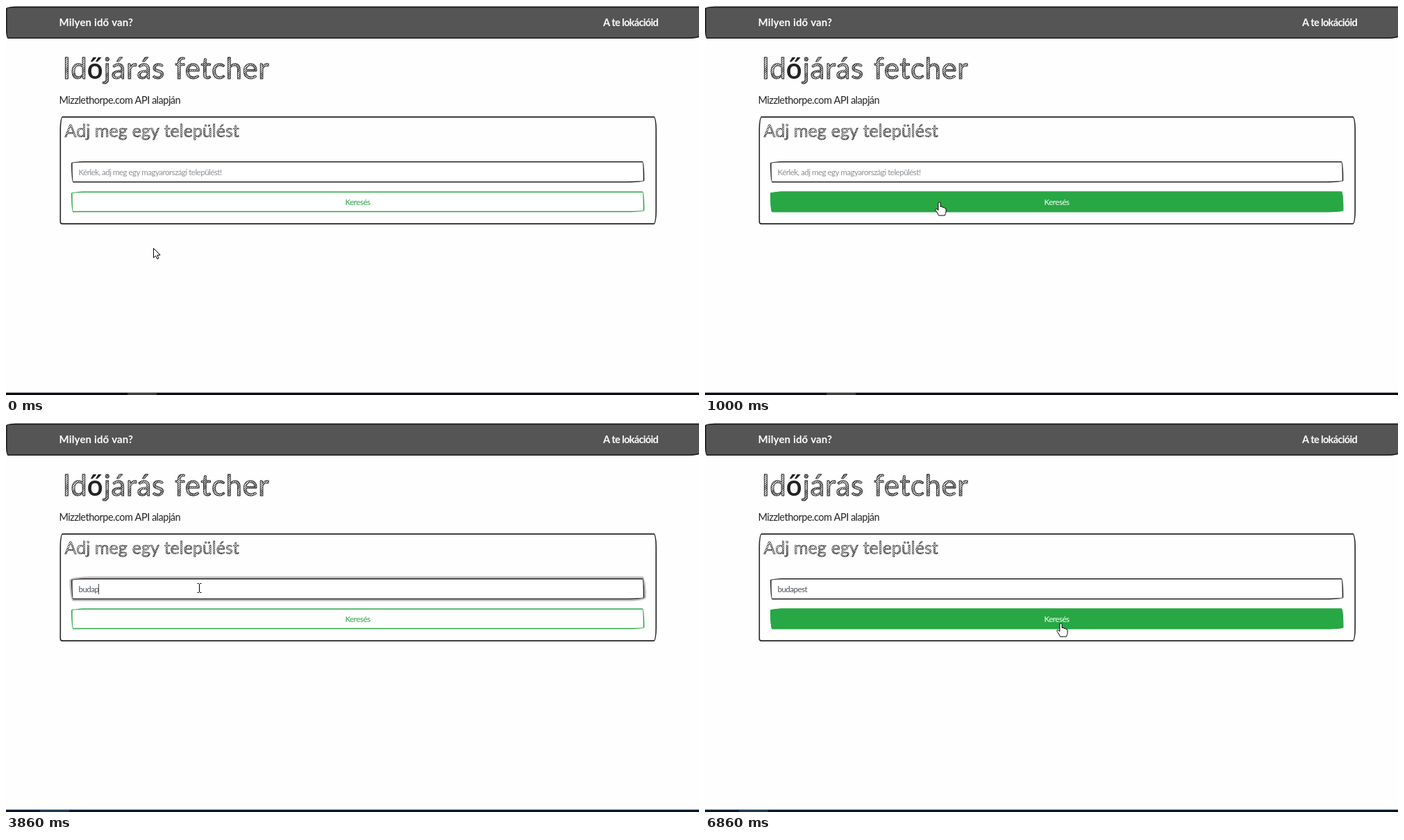
Write an HTML page with a canvas that moves like this. It is 998 px wide and 561 px high and loops after 8 s.

```html
<!DOCTYPE html>
<html lang="hu">
<head>
<meta charset="utf-8">
<title>Időjárás fetcher</title>
<style>
  html, body { margin: 0; width: 100%; height: 100%; overflow: hidden; background: #fefefe; }
  canvas { display: block; width: 998px; height: 561px; }
</style>
</head>
<body>
<canvas id="stage" width="998" height="561"></canvas>
<script>
const ctx = document.getElementById('stage').getContext('2d');
const LOOP = 8000, STEP = 1000 / 15;
const INK = '#232323', PAGE = '#fefefe', GREEN = [40, 167, 69], WHITE = [255, 255, 255];

// Elliptical corner radii [x, y], clockwise from top left
const ROUGH = [[255, 25], [25, 225], [225, 25], [25, 255]];
const CARD = [[4, 19], [4, 19], [4, 19], [4, 4]];
const BAR = [[19, 4], [19, 43], [43, 19], [4, 19]];
const FIELD = { x: 94, y: 223.9, w: 825.3, h: 30.6 };
const BUTTON = { x: 94, y: 267.4, w: 825.3, h: 29.9 };

const ARROW = new Path2D('M0 0V13.6L3.2 10.7 5.3 15.3 7.4 14.4 5.4 9.9 9.6 9.6Z');
const HAND = new Path2D('M-1.6 1.2Q0-.8 1.6 1.2V7Q4 5.6 4.8 8 7 7 7.6 9 9.6 8.4 9.6 11V14Q9.4 17 7.7 19.6H-1Q-2 17-4.8 13-6.8 10.4-5 10-3.4 10-1.6 12Z');
const BEAM = new Path2D('M-3-6.5H-1L0-5.5 1-6.5H3M0-5.5V5.5M-3 6.5H-1L0 5.5 1 6.5H3');

// Pointer path: time, x, y
const PATH = [
  [470, 212, 349], [600, 232, 337], [760, 282, 303], [870, 320, 288], [1000, 337, 282],
  [1130, 331, 277], [1260, 306, 262], [1400, 287, 243], [1730, 278, 238],
  [5270, 278, 238], [5400, 310, 243], [5530, 388, 255], [5640, 468, 277],
  [5730, 506, 290], [6060, 511, 288], [6540, 511, 288], [6600, 512, 288]
];
// When each letter of the typed word appears
const WORD = 'budapest';
const KEYS = [3130, 3260, 3530, 3600, 3860, 4000, 4060, 4260];
const BLINK = 533;

const clamp = v => Math.max(0, Math.min(1, v));
const ramp = (t, start, length) => clamp((t - start) / length);
const mix = (a, b, k) => `rgb(${a.map((v, i) => Math.round(v + (b[i] - v) * k))})`;

function pointerAt(t) {
  let i = PATH.findIndex(p => p[0] > t);
  if (i === 0) return PATH[0].slice(1);
  if (i < 0) return PATH[PATH.length - 1].slice(1);
  const [t0, x0, y0] = PATH[i - 1], [t1, x1, y1] = PATH[i];
  const k = (t - t0) / (t1 - t0);
  return [x0 + (x1 - x0) * k, y0 + (y1 - y0) * k];
}

function fitRadii({ w, h }, radii) {
  const [a, b, c, d] = radii;
  const k = Math.min(1, w / (a[0] + b[0]), w / (c[0] + d[0]), h / (a[1] + d[1]), h / (b[1] + c[1]));
  return radii.map(r => r.map(v => v * k));
}

function addBox({ x, y, w, h }, radii, grow = 0) {
  const corners = radii.map(([rx, ry]) => ({ x: Math.max(0, rx + grow), y: Math.max(0, ry + grow) }));
  ctx.roundRect(x - grow, y - grow, w + 2 * grow, h + 2 * grow, corners);
}

function fillBox(box, shape, color) {
  ctx.beginPath();
  addBox(box, fitRadii(box, shape));
  ctx.fillStyle = color;
  ctx.fill();
}

function ring(box, shape, outer, inner, color) {
  const radii = fitRadii(box, shape);
  ctx.beginPath();
  addBox(box, radii, outer);
  addBox(box, radii, inner);
  ctx.fillStyle = color;
  ctx.fill('evenodd');
}

function setFont(font, spacing = 0, wordSpacing = 0) {
  ctx.font = `${font} Lato, sans-serif`;
  ctx.letterSpacing = spacing + 'px';
  ctx.wordSpacing = wordSpacing + 'px';
}

function label(text, x, y, font, color, spacing, align = 'left') {
  setFont(font, spacing);
  ctx.textAlign = align;
  ctx.fillStyle = color;
  ctx.fillText(text, x, y);
}

function makeHatch() {
  const tile = document.createElement('canvas');
  tile.width = tile.height = 24;
  const g = tile.getContext('2d');
  g.fillStyle = '#e4e4e4';
  g.fillRect(0, 0, 24, 24);
  g.strokeStyle = '#333';
  for (let i = -24; i < 48; i += 3) {
    g.lineWidth = 0.8 + 0.6 * Math.abs(Math.sin(i % 24));
    g.beginPath();
    g.moveTo(i, 24);
    g.lineTo(i + 24, 0);
    g.stroke();
  }
  return ctx.createPattern(tile, 'repeat');
}
const hatch = makeHatch();

function sketch(text, x, y, line) {
  ctx.textAlign = 'left';
  ctx.lineJoin = 'round';
  ctx.lineWidth = line;
  ctx.fillStyle = hatch;
  ctx.strokeStyle = INK;
  ctx.fillText(text, x, y);
  ctx.strokeText(text, x, y);
  return x + ctx.measureText(text).width;
}

function drawPage() {
  ctx.fillStyle = PAGE;
  ctx.fillRect(0, 0, 998, 561);
  const bar = { x: 0, y: 0.8, w: 1014, h: 46.2 };
  fillBox(bar, BAR, '#555');
  ring(bar, BAR, 0, -1.6, '#1c1c1c');
  label('Milyen idő van?', 76.5, 28.5, 'bold 15px', '#fff', 0.15);
  label('A te lokációid', 860, 29, 'bold 14.5px', '#fff', -0.65);

  setFont('42px', 0.6, 3);
  let x = sketch('Id', 81.5, 105, 0.9);
  ctx.font = '600 39px "Open Sans", sans-serif';
  ctx.fillStyle = INK;
  ctx.fillText('ő', x - 1, 105);
  x += ctx.measureText('ő').width - 1;
  setFont('42px', 0.6, 3);
  sketch('járás fetcher', x, 105, 0.9);

  label('Mizzlethorpe.com API alapján', 76.5, 140.5, '14.5px', INK, -0.5);

  ring({ x: 77.5, y: 159.3, w: 859.5, h: 155.6 }, CARD, 0, -1.6, INK);
  setFont('25px', 0, 0.5);
  sketch('Adj meg egy települést', 84.5, 189, 0.5);
}

function drawField(t) {
  const typed = WORD.slice(0, KEYS.filter(k => k <= t + STEP / 2).length);
  const glow = ramp(t, 2110, 150) * (1 - ramp(t, 6740, 120));
  if (glow > 0) ring(FIELD, ROUGH, 2.6, 0, `rgba(60,60,60,${0.32 * glow})`);
  fillBox(FIELD, ROUGH, '#fff');
  ring(FIELD, ROUGH, 0, -1.6, INK);

  const text = typed || 'Kérlek, adj meg egy magyarországi települést!';
  label(text, 104.5, 243.7, '11.5px', typed ? '#495057' : '#8b8f93', -0.5);

  // The blink restarts with every key
  const since = Math.max(2130, ...KEYS.filter(k => k <= t));
  if (t >= 2060 && t < 6800 && Math.floor((t - since + 8) / BLINK) % 2 === 0) {
    ctx.fillStyle = '#444';
    ctx.fillRect(Math.round(104.5 + (typed ? ctx.measureText(typed).width : 0)), 232, 1, 15);
  }
}

function drawButton(t) {
  const hover = ramp(t, 750, 150) * (1 - ramp(t, 1250, 150)) + ramp(t, 5625, 145);
  fillBox(BUTTON, ROUGH, mix(WHITE, GREEN, hover));
  ring(BUTTON, ROUGH, 0, -1.6, mix(GREEN, GREEN, 0));
  label('Keresés', 506.5, 286.8, '11.5px', mix(GREEN, WHITE, hover), -0.45, 'center');
}

function drawTaskbar(t) {
  const active = t >= 2000;
  ctx.fillStyle = active ? '#04162d' : '#0b0b12';
  ctx.fillRect(0, 557.6, 998, 4);
  if (active && t < 2190) return;
  ctx.fillStyle = active ? '#1d3b57' : '#3b3b40';
  ctx.fillRect(active ? 49 : 175, 558, 42, 3);
}

function drawPointer(t) {
  const [x, y] = pointerAt(t);
  const inside = box => y > box.y && y < box.y + box.h;
  ctx.save();
  ctx.translate(Math.round(x), Math.round(y));
  ctx.lineWidth = 1;
  ctx.strokeStyle = '#000';
  ctx.fillStyle = '#fff';
  if (inside(FIELD)) {
    ctx.translate(0.5, 0);
    ctx.stroke(BEAM);
  } else {
    const shape = inside(BUTTON) ? HAND : ARROW;
    ctx.translate(0.5, 0.5);
    ctx.fill(shape);
    ctx.stroke(shape);
  }
  ctx.restore();
}

function render(now) {
  const time = now % LOOP;
  const t = Math.floor((time + 6.7) / STEP) * STEP;
  if (t > 100 && t < 195) {
    ctx.fillStyle = '#000002';
    ctx.fillRect(0, 0, 998, 561);
  } else {
    drawPage();
    drawField(t);
    drawButton(t);
    drawTaskbar(t);
  }
  drawPointer(t);
}

const begin = performance.now();
function tick() {
  render(performance.now() - begin);
  requestAnimationFrame(tick);
}
tick();
</script>
</body>
</html>
```
